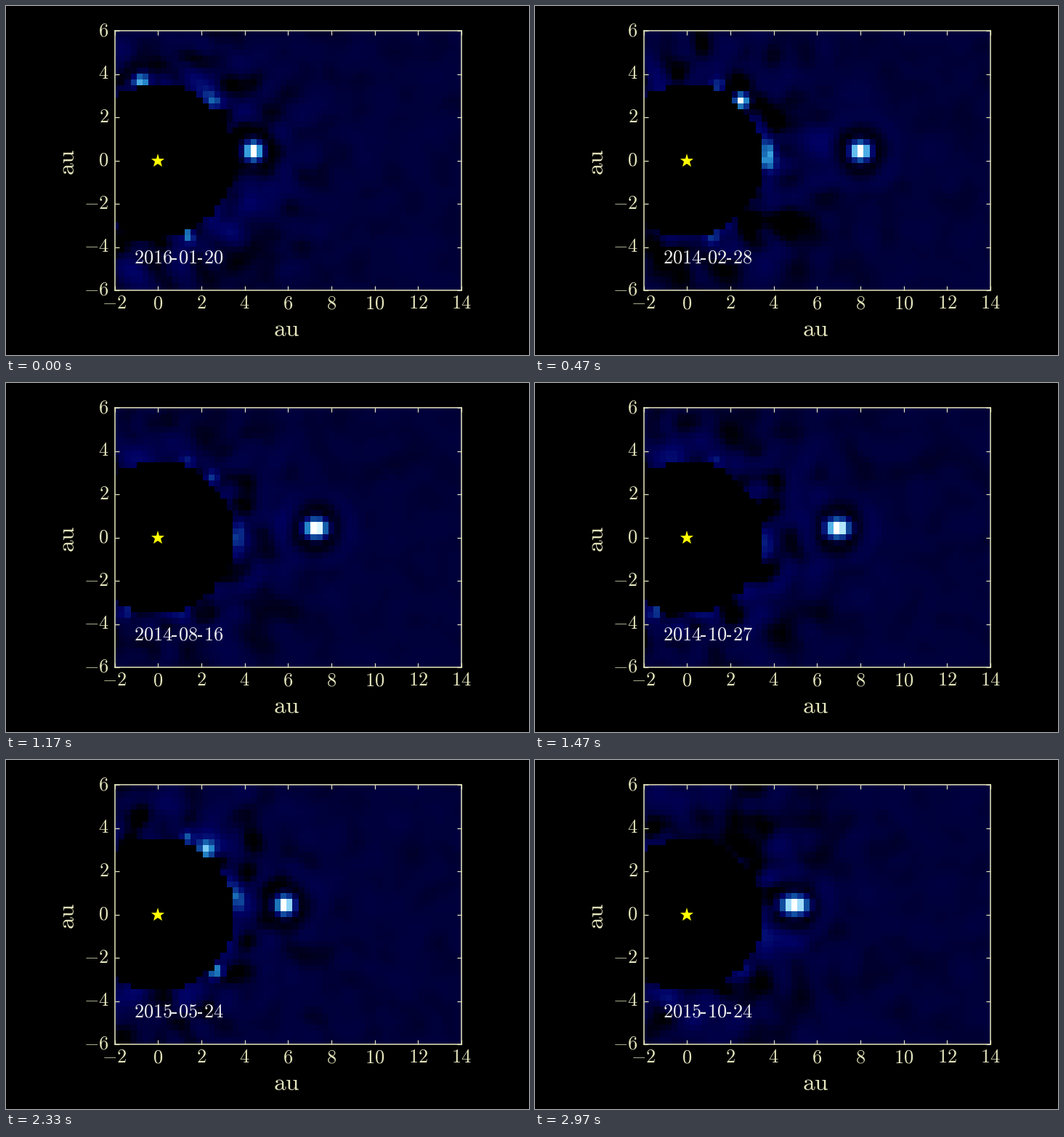
A matplotlib script that plays this animation: 720x480 px, repeating every 3.01 s.

```python
import numpy as np
import matplotlib.pyplot as plt
from matplotlib.animation import FuncAnimation
from matplotlib.colors import LinearSegmentedColormap
from matplotlib.patches import Rectangle

W, H, DPI = 720, 480, 100
LOOP, TICK = 3010, 10          # ms
STEPS, STEP_RATE = 90, 0.03    # steps in the loop, steps per ms
START = np.datetime64("2013-11-16")
DAYS_PER_STEP, LAST_STEP = 8.035, 99

LEFT, RIGHT, TOP, BOTTOM = 149.5, 627, 34, 391
CELL = 0.2764                  # au
MASK = 3.5                     # au
PLANET_Y = 0.43
PALE, WHITE = "#e4e4bc", "#eeeeee"
SIZE, EM = 19, 26.4

plt.rcParams["mathtext.fontset"] = "cm"

space = LinearSegmentedColormap.from_list("space", [
    (0, "#000000"), (0.06, "#00003c"), (0.14, "#000060"), (0.2, "#030c70"),
    (0.3, "#0a2f8c"), (0.45, "#1768b0"), (0.6, "#2f98d8"),
    (0.75, "#74c8f6"), (0.88, "#c4f0ff"), (1, "#ffffff")])

# Detector cells, centres in au
cols, rows = 60, 45
west, north = 4.249 - 23 * CELL, 0.706 + 20 * CELL
X, Y = np.meshgrid(west + CELL * (np.arange(cols) + 0.5),
                   north - CELL * (np.arange(rows) + 0.5))
R, ANGLE = np.hypot(X, Y), np.degrees(np.arctan2(Y, X))


def smooth_noise(rng, passes=3):
    n = rng.standard_normal((rows, cols))
    for _ in range(passes):
        for axis in (0, 1):
            n = (np.roll(n, 1, axis) + 2 * n + np.roll(n, -1, axis)) / 4
    return n / n.std()


def halo(seed, knots):
    """Starlight residue: speckle fading outwards, bright knots on the rim."""
    rng = np.random.default_rng(seed)
    fade = np.exp(-np.maximum(R - MASK, 0) / 2)
    field = 0.06 + (0.004 + 0.06 * fade) * smooth_noise(rng)
    rim = np.exp(-((R - 3.72) / 0.32) ** 2) * rng.uniform(0.8, 1.2, R.shape)
    for angle, spread, level in knots:
        turn = (ANGLE - angle + 180) % 360 - 180
        field += level * rim * np.exp(-(turn / spread) ** 2)
    return np.clip(field, 0, None)


# Observing dates: day, planet blur in cells, knots (angle, spread, level)
EPOCHS = [
    (104, 1.08, [(48, 5, 0.95), (3, 11, 0.65), (68, 5, 0.35), (-72, 5, 0.25)]),
    (345, 1.25, [(70, 7, 0.26), (-10, 15, 0.12), (-113, 4, 0.32)]),
    (441, 1.0, [(65, 4, 1.3), (-113, 4, 1.1), (-58, 16, 0.4), (105, 12, 0.35)]),
    (554, 1.0, [(53, 5, 0.62), (-45, 5, 0.62), (13, 9, 0.4), (70, 4, 0.35)]),
    (707, 1.4, [(-45, 8, 0.15)]),
    (795, 0.95, [(102, 6, 0.7), (-68, 3, 0.55), (47, 8, 0.35)]),
]
days, blurs, knots = zip(*EPOCHS)
halos = [halo(seed, k) for seed, k in enumerate(knots)]


def planet_x(day):
    return 7.97 - 0.00452 * (day - 104) - 1.88e-6 * (day - 104) * (day - 441)


def sky(day):
    weights = [np.interp(day, days, hat) for hat in np.eye(len(days))]
    dust = np.tensordot(weights, halos, 1)

    dx, dy = (X - planet_x(day)) / CELL, (Y - PLANET_Y) / CELL
    d = np.hypot(dx, dy)
    dust = dust * (1 - np.exp(-(d / 4) ** 4))
    dust += 0.03 * np.exp(-((d - 6) / 1.3) ** 2)
    blur = np.dot(weights, blurs)
    core = 1.2 * np.exp(-((dx / blur) ** 2 + dy ** 2) / 2)
    return np.where(R < MASK, 0, np.maximum(dust, core))


fig = plt.figure(figsize=(W / DPI, H / DPI), dpi=DPI, facecolor="black")
ax = fig.add_axes([LEFT / W, 1 - BOTTOM / H,
                   (RIGHT - LEFT) / W, (BOTTOM - TOP) / H], facecolor="black")


def put(x, y, s, size=SIZE, color=PALE, va="baseline", **kw):
    return fig.text(x / W, 1 - y / H, s, fontsize=size, color=color,
                    va=va, **kw)


img = ax.imshow(sky(0), cmap=space, vmin=0, vmax=1, aspect="auto",
                interpolation="nearest",
                extent=[west, west + cols * CELL, north - rows * CELL, north])
ax.set(xlim=(-2, 14), ylim=(-6, 6),
       xticks=range(-2, 15, 2), yticks=range(-6, 7, 2))
ax.tick_params(direction="in", top=True, right=True, length=4.5, width=0.9,
               color=PALE, labelbottom=False, labelleft=False)
for side in ax.spines.values():
    side.set(color=PALE, linewidth=1.1)
ax.plot(0, 0, "*", color="#ffff00", markersize=14, markeredgewidth=0)

for v in range(-2, 15, 2):
    put(LEFT + (v + 2) * (RIGHT - LEFT) / 16, 416.5, f"${v}$", ha="center")
for v in range(-6, 7, 2):
    put(141.5, TOP + (6 - v) * (BOTTOM - TOP) / 12 + 7, f"${v}$", ha="right")
put(386.5, 453.5, r"$\mathrm{au}$", 24, ha="center")
put(84.5, 214.5, r"$\mathrm{au}$", 24, ha="center", va="center", rotation=90)

# Date: three number groups joined by hyphens
DATE_X, DATE_Y, HYPHEN = 175.5, 354, EM / 3
starts = [DATE_X, DATE_X + 2 * EM + HYPHEN, DATE_X + 3 * EM + 2 * HYPHEN]
groups = [put(x, DATE_Y, "", color=WHITE) for x in starts]
for x in starts[1:]:
    fig.add_artist(Rectangle(
        ((x - HYPHEN) / W, 1 - (DATE_Y - 0.185 * EM) / H),
        0.265 * EM / W, 0.065 * EM / H, color=WHITE, linewidth=0))


def update(i):
    step = min(int((i + 0.5) * TICK * STEP_RATE), STEPS - 1)
    # The loop opens on the final date, then cuts back to the first
    day = (step - 1 if step else LAST_STEP) * DAYS_PER_STEP
    img.set_data(sky(day))
    date = str(START + np.timedelta64(int(day), "D"))
    for text, digits in zip(groups, date.split("-")):
        text.set_text(rf"$\mathrm{{{digits}}}$")
    return [img, *groups]


anim = FuncAnimation(fig, update, frames=LOOP // TICK, interval=TICK,
                     repeat=True, repeat_delay=0, blit=False)
plt.show()
```
